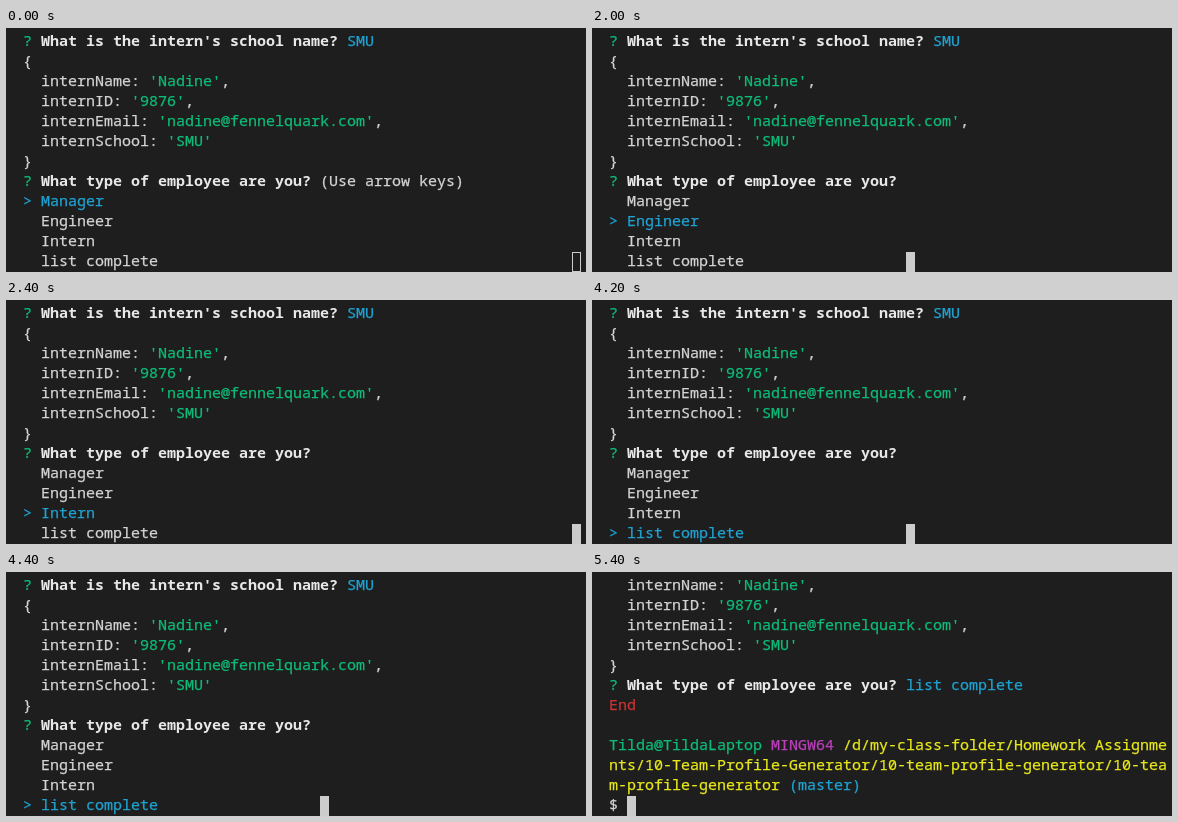
Animation of 580 by 244 pixels, one loop 5.8 s. Source, as an HTML page:

```html
<!DOCTYPE html>
<html lang="en">
<head>
<meta charset="utf-8">
<title>Terminal prompt</title>
<style>
  html, body { margin: 0; width: 100%; height: 100%; overflow: hidden; background: #1e1e1e; }
  #screen {
    position: absolute; left: 17px; top: 2px; margin: 0;
    font: 15px/20px "Noto Sans Mono", monospace; color: #d4d4d4;
    font-variant-ligatures: none; -webkit-text-stroke: 0.25px;
  }
  #cursor {
    position: absolute; box-sizing: border-box; width: 9px; height: 20px;
    border: 1px solid #ccc; background: #ccc;
  }
  #cursor.hollow { background: none; }
  b { color: #e8e8e8; -webkit-text-stroke: 0; }
  .green { color: #0dbc79; }
  .cyan { color: #1fa3d2; }
  .red { color: #cd3131; }
  .magenta { color: #bc3fbc; }
  .yellow { color: #e8e81c; }
</style>
</head>
<body>
<pre id="screen"></pre>
<div id="cursor"></div>
<script>
const LOOP = 5800, CELL = 9, ROW = 20;
const screenEl = document.getElementById('screen');
const cursorEl = document.getElementById('cursor');

const paint = (color, text) => `<span class="${color}">${text}</span>`;
const ask = (question, answer) => `${paint('green', '?')} <b>${question}</b> ${answer}`;
const field = (key, value, end = ',') => `  ${key}: ${paint('green', `'${value}'`)}${end}`;

const history = [
  ask("What is the intern's school name?", paint('cyan', 'SMU')),
  '{',
  field('internName', 'Nadine'),
  field('internID', '9876'),
  field('internEmail', 'nadine@fennelquark.com'),
  field('internSchool', 'SMU', ''),
  '}'
];
const choices = ['Manager', 'Engineer', 'Intern', 'list complete'];
const askType = answer => ask('What type of employee are you?', answer);

const menu = (selected, hint = '') => [
  ...history,
  askType(hint),
  ...choices.map((c, i) => i === selected ? paint('cyan', '&gt; ' + c) : '  ' + c)
];
const finished = [...history, askType(paint('cyan', 'list complete')), paint('red', 'End')];
const shell = [
  ...finished.slice(2),
  '',
  paint('green', 'Tilda@TildaLaptop') + ' ' + paint('magenta', 'MINGW64') + ' ' +
    paint('yellow', '/d/my-class-folder/Homework Assignme'),
  paint('yellow', 'nts/10-Team-Profile-Generator/10-team-profile-generator/10-tea'),
  paint('yellow', 'm-profile-generator') + ' ' + paint('cyan', '(master)'),
  '$ '
];

// start time, lines, cursor column, cursor row, hollow cursor
const states = [
  [0, menu(0, '(Use arrow keys)'), 61, 11, true],
  [600, menu(0, '(Use arrow keys)'), 61, 11],
  [2000, menu(1), 33, 11],
  [2400, menu(2), 61, 11],
  [2600, menu(2), 33, 11],
  [4200, menu(3), 33, 11],
  [5200, finished, 0, 9],
  [5400, shell, 2, 11]
];

let shown;
function draw() {
  const t = performance.now() % LOOP;
  const state = states.findLast(s => s[0] <= t);
  if (state !== shown) {
    const [, lines, col, row, hollow = false] = shown = state;
    screenEl.innerHTML = lines.join('\n');
    cursorEl.style.left = 17 + col * CELL + 'px';
    cursorEl.style.top = 4 + row * ROW + 'px';
    cursorEl.classList.toggle('hollow', hollow);
  }
  requestAnimationFrame(draw);
}
draw();
</script>
</body>
</html>
```
